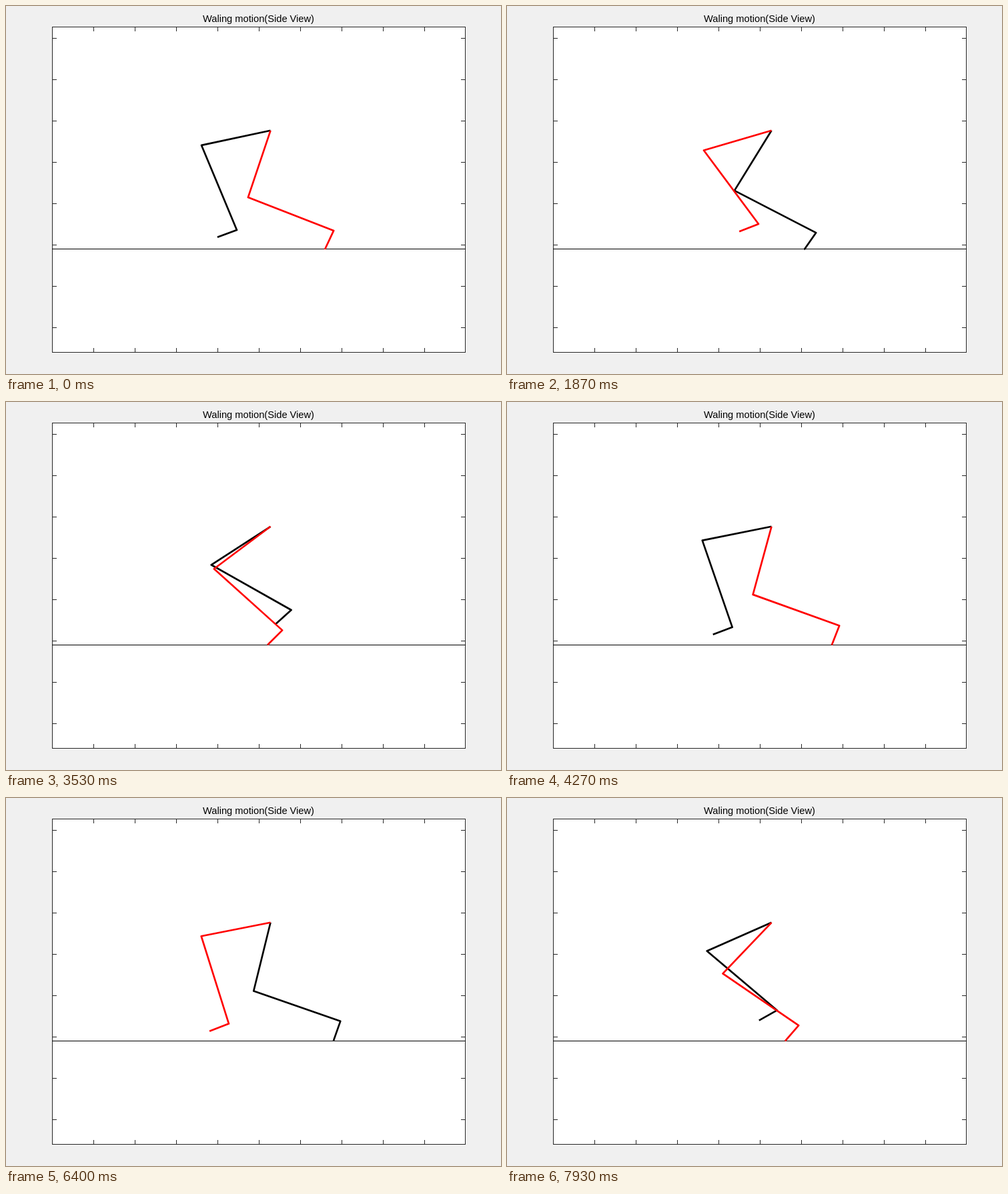
An HTML page that plays this animation: 742x552 px, repeating every 8 s.

```html
<!DOCTYPE html>
<html lang="en">
<head>
<meta charset="utf-8">
<title>Walking motion</title>
<style>
  html, body { margin: 0; width: 100%; height: 100%; overflow: hidden; background: #f0f0f0; }
  svg { display: block; }
  text { font: 14.67px "Liberation Sans", Arial, sans-serif; text-anchor: middle; }
  .leg { fill: none; stroke-width: 2.67; stroke-linejoin: round; }
</style>
</head>
<body>
<svg width="742" height="552" viewBox="0 0 742 552">
  <rect x="69.5" y="31.5" width="619" height="488" fill="#fff" stroke="#262626"/>
  <path id="ticks" stroke="#262626"/>
  <path d="M69 364.5H689" stroke="#000"/>
  <text x="378.5" y="24">Waling motion(Side View)</text>
  <path id="black" class="leg" stroke="#000"/>
  <path id="red" class="leg" stroke="#f00"/>
</svg>
<script>
const LOOP = 8000, FRAME = 1000 / 15, FRAMES = 120;
const STRIDE = 63;          // frames in one full stride
const TOUCHDOWN = 39;       // frame in which the red foot starts its stance
const HIP = [396.5, 186.8];

// Each segment swings about a mean angle (degrees from straight down);
// the harmonics of the stride are [cosine, sine] amplitudes.
const segments = [
  { length: 105.8, side: -1, mean: 50.73,   // thigh
    harmonics: [[32.84, -7.85], [-4.86, 2.43], [0.35, -0.8], [-0.46, 1.01], [-0.19, -0.49]] },
  { length: 137.7, side: 1, mean: 48.75,    // shank
    harmonics: [[-32.48, -1.35], [-5.32, 3.2], [0.16, -0.04], [-0.58, 0.2], [0.52, 0.54]] },
  { length: 31, side: -1, mean: 40.14,      // foot
    harmonics: [[31.42, -3.62], [-9.76, -7.5], [1.25, 3.03], [-0.57, -0.35]] }
];

const angleAt = ({ mean, harmonics }, phase) => harmonics.reduce(
  (sum, [c, s], i) => sum + c * Math.cos((i + 1) * phase) + s * Math.sin((i + 1) * phase),
  mean) * Math.PI / 180;

function drawLeg(id, phase) {
  let [x, y] = HIP, d = `M${x} ${y}`;
  for (const segment of segments) {
    const angle = angleAt(segment, phase);
    x += segment.side * segment.length * Math.sin(angle);
    y += segment.length * Math.cos(angle);
    d += `L${x.toFixed(2)} ${y.toFixed(2)}`;
  }
  document.getElementById(id).setAttribute("d", d);
}

let marks = "";
for (let i = 1; i < 10; i++) {
  const x = 69.5 + 62 * i;
  marks += `M${x} 31v7M${x} 520v-7`;
}
for (let i = 0; i < 8; i++) {
  const y = 48.5 + 62 * i;
  marks += `M69 ${y}h7M689 ${y}h-7`;
}
document.getElementById("ticks").setAttribute("d", marks);

const start = performance.now();
function draw() {
  const time = (performance.now() - start) % LOOP;
  // Frames begin on times rounded to 10 ms
  const frame = Math.floor((time + 3.4) / FRAME) % FRAMES;
  const phase = 2 * Math.PI * (frame - TOUCHDOWN) / STRIDE;
  drawLeg("black", phase + Math.PI);
  drawLeg("red", phase);
  requestAnimationFrame(draw);
}
draw();
</script>
</body>
</html>
```
